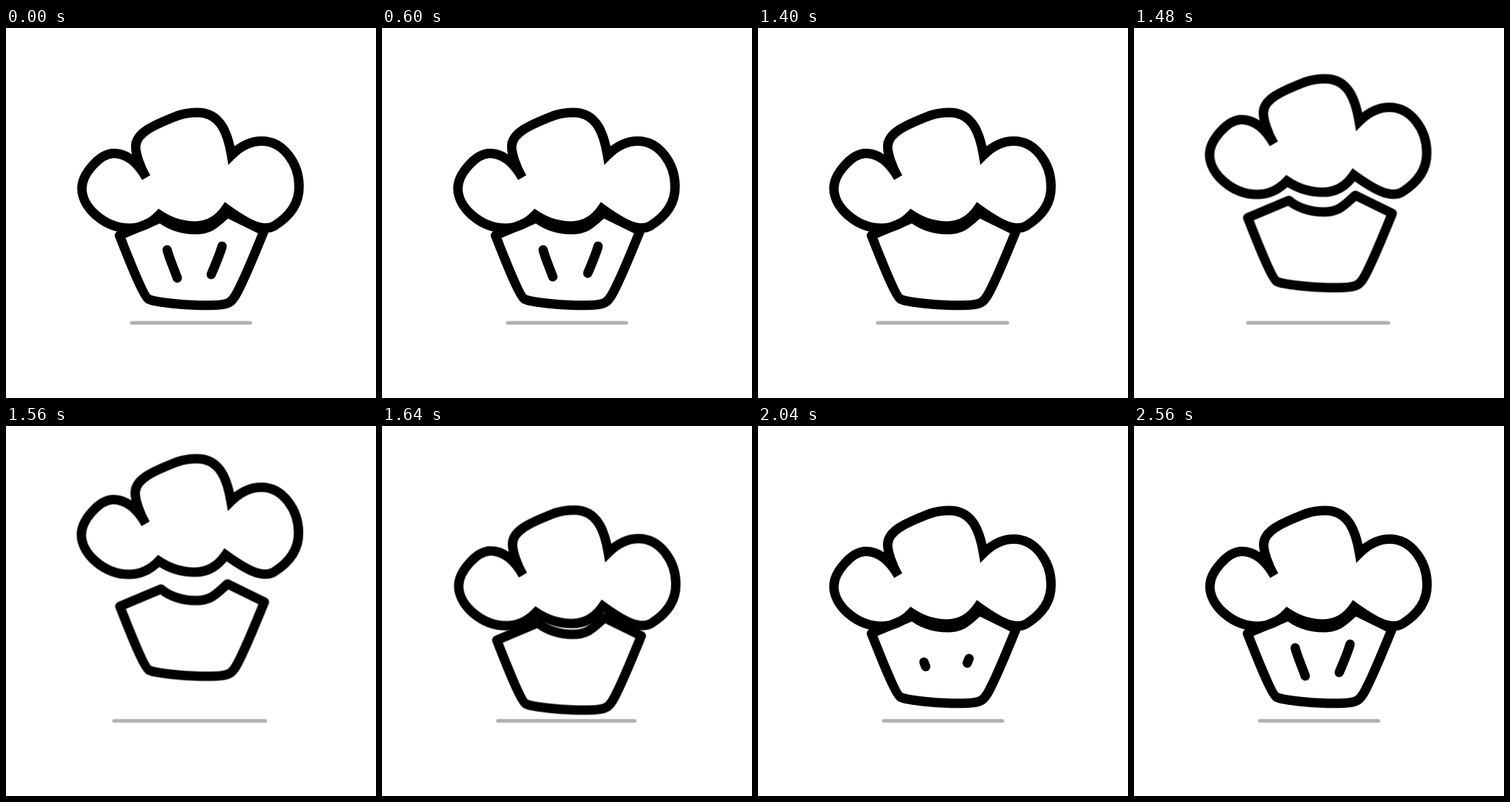
Animation of 512x512 px, one loop 3 s. Source, as an HTML page:

```html
<!DOCTYPE html>
<html lang="en">
<head>
<meta charset="utf-8">
<title>Cupcake</title>
<style>
  html, body { margin: 0; width: 100%; height: 100%; overflow: hidden; background: #fff; }
  svg { display: block; width: 100%; height: 100%; }

  .ink { fill: none; stroke: #000; stroke-width: 13; }
  .shadow { fill: #b0b0b0; x: 171.5px; width: 169px; }
  .cup { stroke-linejoin: round; }
  .stripe { stroke-linecap: round; stroke-dasharray: 100 200; }

  .shadow, .cup, .cloud, .stripe { animation: 3s linear infinite; }
  .shadow { animation-name: shadow; }
  .cup { animation-name: hop; --up: .5px, -37.5px; --down: 2px, 18px; }
  .cloud { animation-name: hop; --up: -.7px, -71.7px; --down: 1.4px, 12.5px; }
  .stripe { animation-name: stripe; }

  @keyframes shadow {
    0%, 44%, 58%, 100% { x: 171.5px; width: 169px; }
    52% { x: 147px; width: 214.5px; }
  }

  @keyframes hop {
    0% { transform: translate(0px, 0px); }
    46.667% { transform: translate(0px, 0px); animation-timing-function: cubic-bezier(.4, 0, .4, 1); }
    52% { transform: translate(var(--up)); animation-timing-function: cubic-bezier(.3, 0, .1, 1); }
    57.333% { transform: translate(var(--down)); animation-timing-function: ease-in-out; }
    62.667%, 100% { transform: translate(0px, 0px); }
  }

  /* Bottom end retracts, top end follows; later both grow back out. */
  @keyframes stripe {
    0%, 18% { stroke-dasharray: 100 200; stroke-dashoffset: 0; visibility: visible; }
    35.333% { stroke-dasharray: 62 200; stroke-dashoffset: 0; visibility: visible; }
    44%, 64.667% { stroke-dasharray: .01 200; stroke-dashoffset: -60; visibility: hidden; }
    85.333%, 100% { stroke-dasharray: 100 200; stroke-dashoffset: 0; visibility: visible; }
  }
</style>
</head>
<body>
<svg viewBox="0 0 512 512">
  <rect class="shadow" y="405.5" height="5" rx="2.5"/>
  <path class="ink cup" d="M157 287 L214 263 C224 272 242 279 262 279 C284 279 291 269 306 256
    L357 281 C345 310 328 353 317 371 C312 379 308 383 290 383.500
    C260 385 206 380 197 375 C190 371 170 320 157 287 Z"/>
  <path class="ink stripe" pathLength="100" d="M223 307 C226 319 232 332 237 346"/>
  <path class="ink stripe" pathLength="100" d="M299 302 C296 313 290 327 284 341"/>
  <path class="ink cloud" d="M194 207 C185 192 179.500 174 179.500 164 C179.500 145 205 134 237 121.500
    C247 118 256 117 265 117 C297 117 307 146 312 176
    C325 163 340 156.500 354 156.500 C384 156.500 405.500 188 405.500 219
    C406 243 392 261 371 274 C354 283 331 269 304.500 250
    C295 264 281 274 262 274 C242 274 226 268 212 258.500
    C202 269 189 277 171 277 C136 277 105 248 105 222
    C105 202 130 173.500 149 173.500 C167 173.500 182 186 194 207 Z"/>
</svg>
</body>
</html>
```
